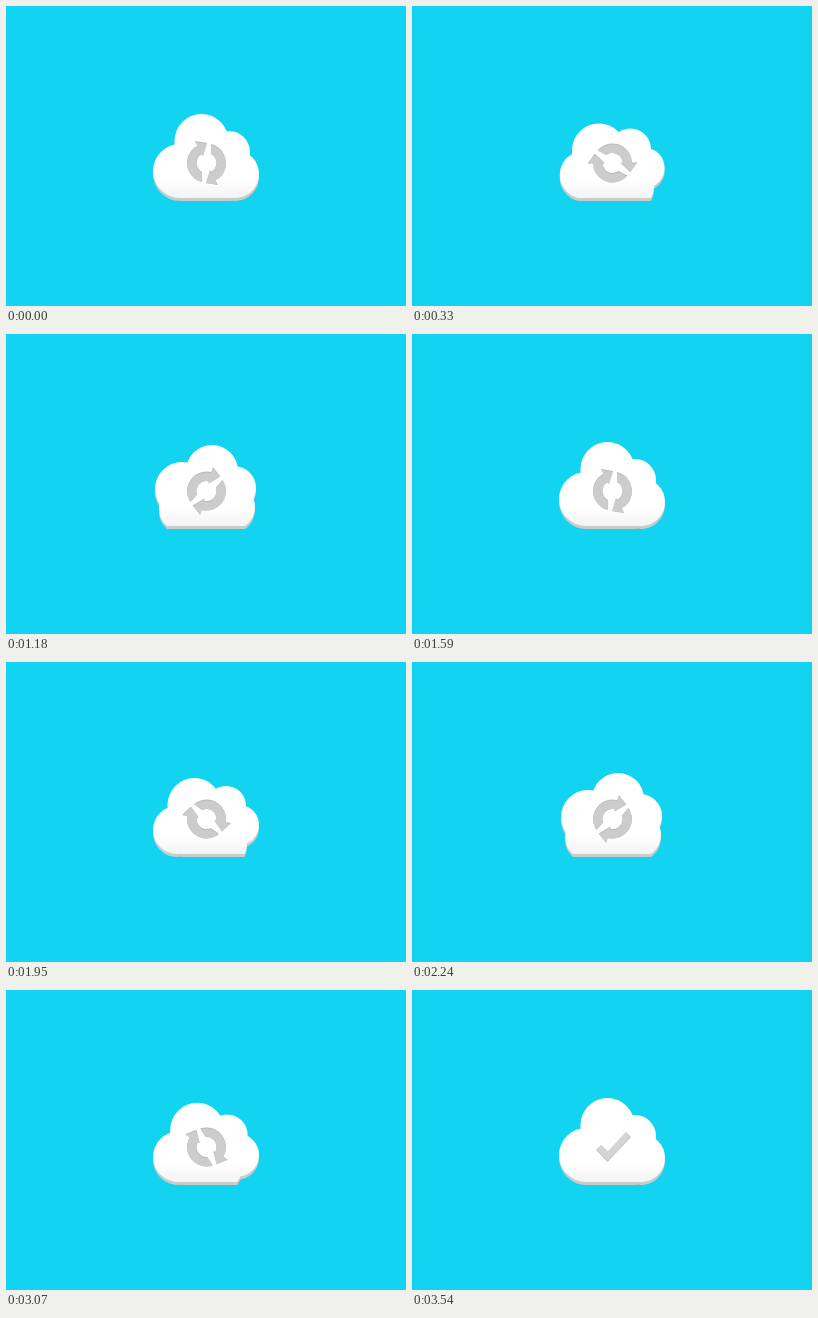
Recreate the animation shown at these times as an HTML page with a canvas. Size 400 by 300 pixels, loop 5540 ms.

```html
<!DOCTYPE html>
<html lang="en">
<head>
<meta charset="utf-8">
<title>Cloud sync</title>
<style>
  html, body { margin: 0; width: 100%; height: 100%; overflow: hidden; background: #12d4f1; }
  canvas { display: block; }
</style>
</head>
<body>
<canvas id="stage" width="400" height="300"></canvas>
<script>
const ctx = document.getElementById('stage').getContext('2d');
const LOOP = 5540, TURN = 530, SPIN_END = 6 * TURN, CHECK_START = 3420;
const STEPS = 17, STEP_MS = 30;

// Path of one puff [x, y, r]: it rises on the left, crosses the top and sinks
// on the right. Three points per turn, at the times in MARKS.
const MARKS = [0, 4 / 17, 12 / 17, 1];
const PATH = [
  [184, 174, 16], [175, 175, 22], [171, 168, 24],
  [174, 165, 27], [176, 155, 27], [188.5, 143, 27],
  [195.5, 135, 27], [206, 137, 26], [220, 144, 20],
  [223, 146, 21], [228, 154, 22], [233, 163, 20],
  [229, 168, 24], [226, 173, 23], [220, 182, 21],
  [212, 176, 16]
];

const clamp = v => Math.max(0, Math.min(1, v));

function puff(lane, u) {
  const i = u < MARKS[1] ? 0 : u < MARKS[2] ? 1 : 2;
  const k = (u - MARKS[i]) / (MARKS[i + 1] - MARKS[i]);
  const from = PATH[lane * 3 + i], to = PATH[lane * 3 + i + 1];
  return from.map((v, j) => v + (to[j] - v) * k);
}

function cloudLayer(puffs, dy, fill) {
  ctx.save();
  ctx.translate(0, dy);
  ctx.beginPath();
  ctx.rect(0, 0, 400, 192);
  ctx.clip();
  ctx.beginPath();
  for (const [x, y, r] of puffs) {
    ctx.moveTo(x + r, y);
    ctx.arc(x, y, r, 0, Math.PI * 2);
  }
  ctx.rect(175, 150, 50, 42);
  ctx.fillStyle = fill;
  ctx.fill();
  ctx.restore();
}

const white = ctx.createLinearGradient(0, 174, 0, 192);
white.addColorStop(0, '#fff');
white.addColorStop(1, '#f3f3f3');

function drawCloud(u) {
  const puffs = [0, 1, 2, 3, 4].map(lane => puff(lane, u));
  cloudLayer(puffs, 3, '#c9cccd');
  cloudLayer(puffs, 0, white);
}

function syncShape(angle) {
  const shape = new Path2D(), rad = Math.PI / 180;
  for (const turn of [0, Math.PI]) {
    const arrow = new Path2D();
    arrow.arc(0, 0, 19.5, -77 * rad, 62 * rad);
    arrow.lineTo(11.5, 22);
    arrow.lineTo(-0.5, 20);
    arrow.lineTo(3.5, 7);
    arrow.arc(0, 0, 10, 60 * rad, -63 * rad, true);
    arrow.closePath();
    shape.addPath(arrow, new DOMMatrix().translate(200.5, 157).rotate((angle + turn) / rad));
  }
  return shape;
}

const checkShape = new Path2D('M214 142L219 147L195.5 172L184 160L189 155L196 161.5Z');

// Grey face with a thin darker edge on one side.
function drawIcon(shape, alpha, edge, face, shift) {
  ctx.save();
  ctx.globalAlpha = alpha;
  ctx.fillStyle = edge;
  ctx.fill(shape);
  ctx.clip(shape);
  ctx.translate(0, shift);
  ctx.fillStyle = face;
  ctx.fill(shape);
  ctx.restore();
}

function draw(t) {
  const step = t < SPIN_END ? Math.min(STEPS - 1, Math.floor(t % TURN / STEP_MS)) : 0;
  const u = step / STEPS;
  ctx.fillStyle = '#12d4f1';
  ctx.fillRect(0, 0, 400, 300);
  drawCloud(u);

  const sync = clamp(1 - Math.floor((t - SPIN_END) / 60) / 3);
  if (sync > 0) drawIcon(syncShape(u * Math.PI), sync, '#b9b9b9', '#cccccc', 1);

  const check = clamp((Math.floor((t - CHECK_START) / STEP_MS) + 1) / 5);
  if (check > 0) {
    ctx.save();
    ctx.translate(0, -3 * (1 - check));
    drawIcon(checkShape, check, '#bfbfbf', '#d4d4d4', -1);
    ctx.restore();
  }
}

const start = performance.now();
function tick() {
  draw((performance.now() - start) % LOOP);
  requestAnimationFrame(tick);
}
tick();
</script>
</body>
</html>
```
